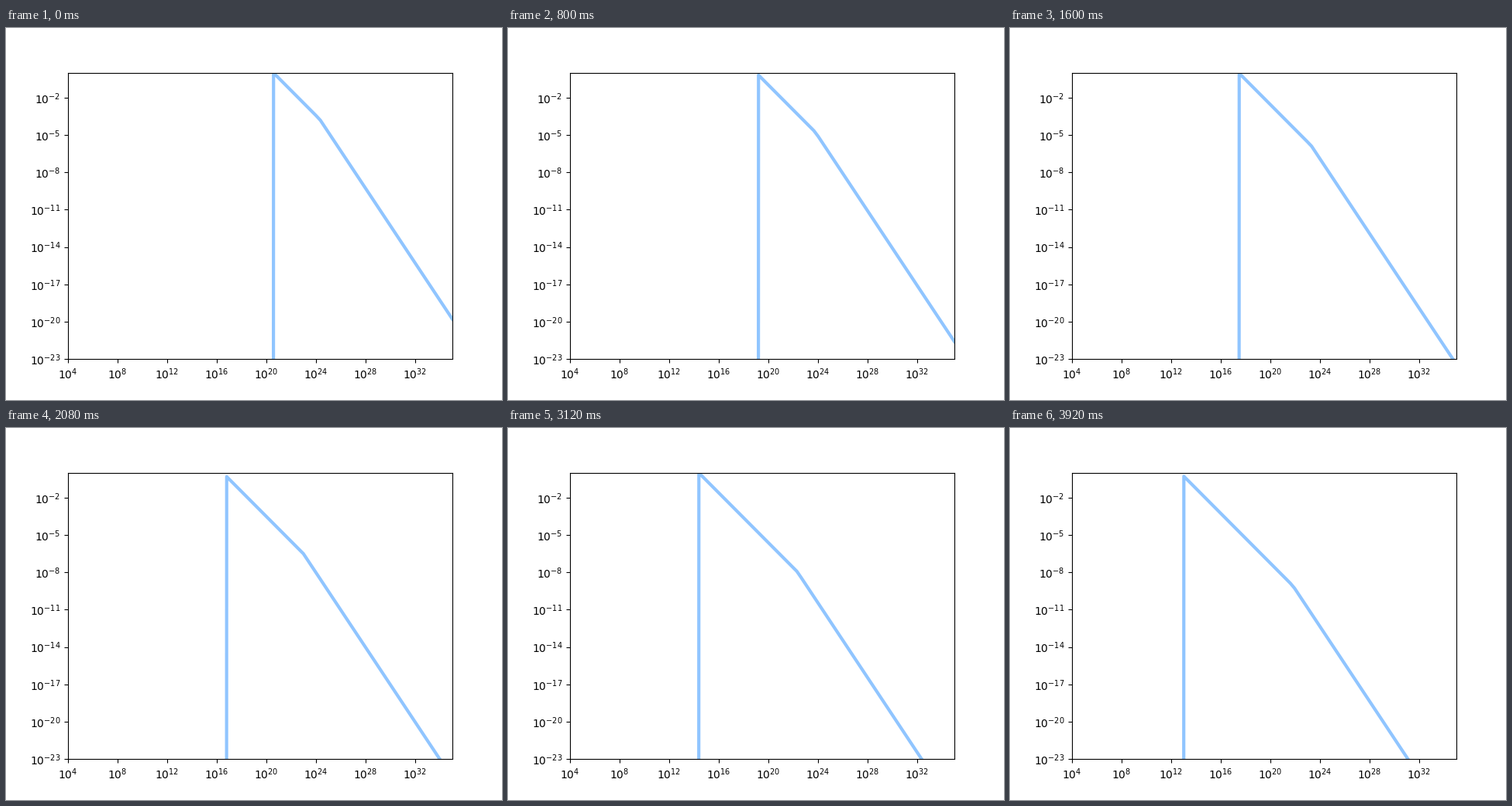
Write a matplotlib script that moves like this. It is 640x480 px and loops after 4 s.

```python
import numpy as np
import matplotlib.pyplot as plt
from matplotlib.animation import FuncAnimation

FRAMES = 50
INTERVAL = 80

x = np.logspace(1, 35, 100)
log_x = np.log10(x)


def spectrum(n):
    """Broken power law with a sharp lower cutoff; both breaks drift left."""
    cutoff = 20.556 - 0.1538 * n - 0.000122 * n**2
    knee = 24.3 - 0.0505 * n
    log_y = cutoff - log_x - 0.5 * np.maximum(log_x - knee, 0)
    return np.where(log_x >= cutoff, 10.0**log_y, 0.0)


fig, ax = plt.subplots(figsize=(6.4, 4.8), dpi=100)
ax.set_xscale("log")
ax.set_yscale("log", nonpositive="clip")
ax.set_xticks([10.0**e for e in range(4, 33, 4)])
ax.set_yticks([10.0**e for e in range(-23, 0, 3)])
ax.minorticks_off()
ax.set_xlim(1e4, 1e35)
ax.set_ylim(1e-23, 1)
line, = ax.plot(x, spectrum(0), color="#90c5ff", lw=3)


def update(n):
    line.set_ydata(spectrum(n))
    return line,


anim = FuncAnimation(fig, update, frames=FRAMES, interval=INTERVAL,
                     init_func=lambda: update(0), repeat=True, repeat_delay=0)
plt.show()
```
